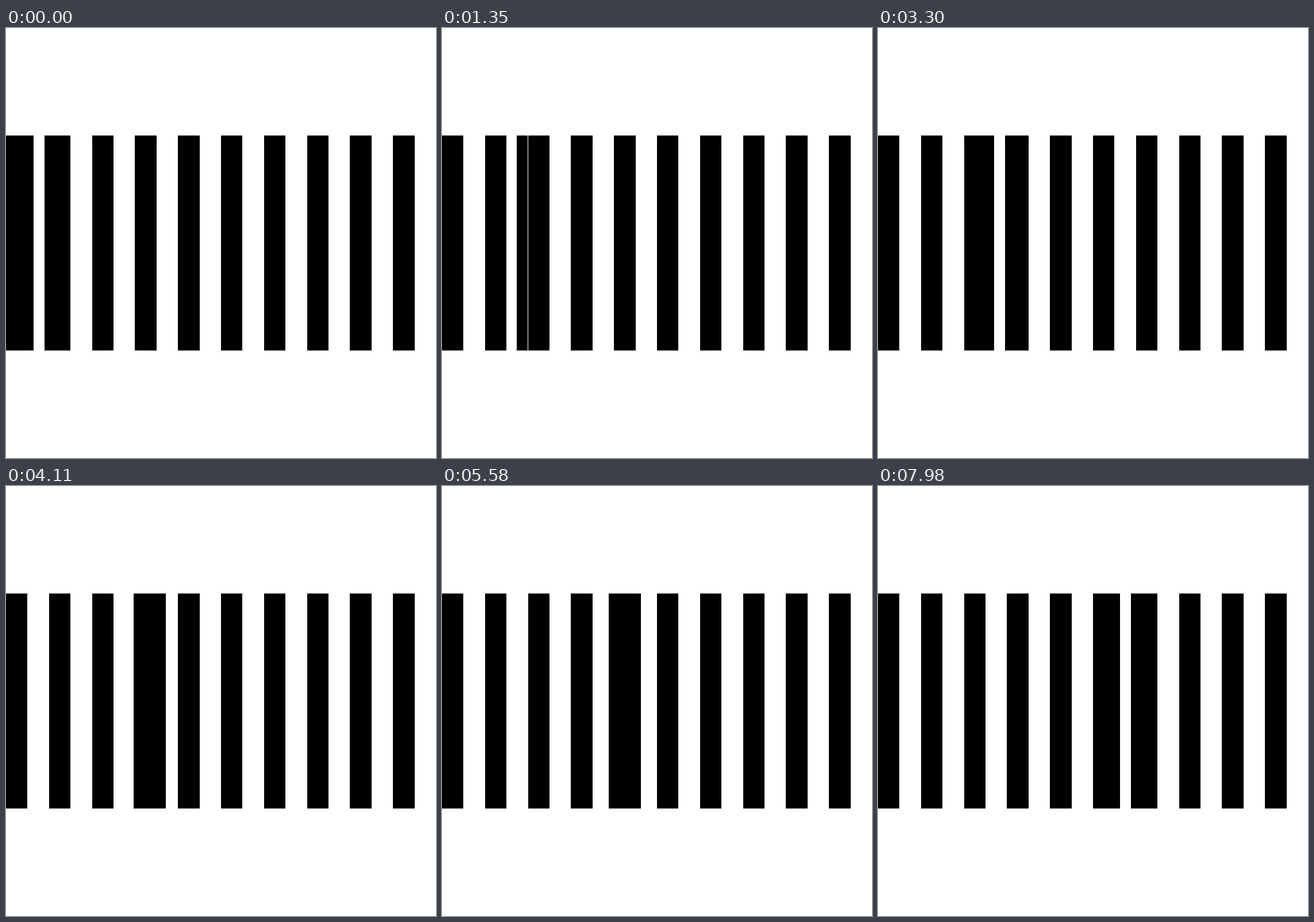
Animation, 748 px wide and 748 px high, one loop 8 s. Source, as an HTML page with a canvas:

```html
<!DOCTYPE html>
<html lang="en">
<head>
<meta charset="utf-8">
<title>Stripes</title>
<style>
  html, body { margin: 0; width: 100%; height: 100%; overflow: hidden; background: #fff; }
  canvas { display: block; }
</style>
</head>
<body>
<canvas id="stage" width="748" height="748"></canvas>
<script>
const ctx = document.getElementById('stage').getContext('2d');
const SIZE = 748;
const LOOP = 8000;
const TICK = 30;
const STRIPE = SIZE / 20;
const THIN = STRIPE / 2;
const START_X = 29.38;
const SPEED = SIZE / 2 / LOOP;

// Both edges snap to whole pixels.
function bar(x, width) {
  const left = Math.round(x);
  ctx.fillRect(left, SIZE / 4, Math.round(x + width) - left, SIZE / 2);
}

function draw(time) {
  const x = START_X + SPEED * Math.floor(time / TICK) * TICK;
  ctx.fillStyle = '#fff';
  ctx.fillRect(0, 0, SIZE, SIZE);
  ctx.fillStyle = '#000';
  for (let i = 0; i < 10; i++) bar(i * 2 * STRIPE, STRIPE);
  bar(x, THIN);
  bar(x + 2 * THIN, THIN);
}

const begin = performance.now();
function frame() {
  draw((performance.now() - begin) % LOOP);
  requestAnimationFrame(frame);
}
frame();
</script>
</body>
</html>
```
